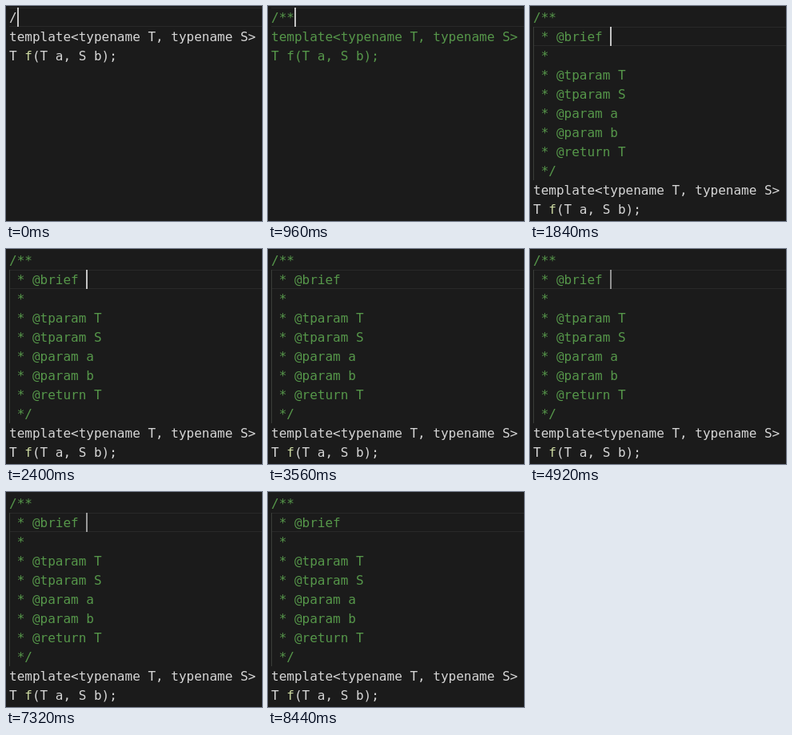
An HTML page with a canvas that plays this animation: 320 px wide and 269 px high, repeating every 8640 ms.

```html
<!DOCTYPE html>
<html lang="en">
<head>
<meta charset="utf-8">
<title>Doc comment typing</title>
<style>
  html, body { margin: 0; width: 100%; height: 100%; overflow: hidden; background: #1b1b1b; }
  canvas { display: block; width: 320px; height: 269px; }
</style>
</head>
<body>
<canvas id="stage"></canvas>
<script>
const W = 320, H = 269, LOOP = 8640;
const LEFT = 4, TOP = 2, LINE = 24, BASE = 18;
const BG = '#1b1b1b', WHITE = '#d6d6d6', GREEN = '#56974a', FUNC = '#cddaa2';
const canvas = document.getElementById('stage');
const ctx = canvas.getContext('2d');
const dpr = window.devicePixelRatio || 1;
canvas.width = W * dpr;
canvas.height = H * dpr;
ctx.scale(dpr, dpr);
ctx.font = '16px "DejaVu Sans Mono", monospace';
const CHAR = ctx.measureText('M').width;

const CODE = ['template<typename T, typename S>', 'T f(T a, S b);'];
const DOC = ['/**', ' * @brief ', ' *', ' * @tparam T', ' * @tparam S',
             ' * @param a', ' * @param b', ' * @return T', ' */'];

// Cursor fades: [start, end, opacity before, opacity after]
const FADES = [
  [3200, 3560, 1, 0], [4640, 5080, 0, 1], [5640, 5960, 1, 0],
  [7080, 7440, 0, 1], [8080, 8440, 1, 0]
];

// Each stage of the edit: start time, comment lines, cursor row and column
const STEPS = [
  { at: 0, doc: ['/'], row: 0, col: 1, code: WHITE },
  { at: 640, doc: ['/*'], row: 0, col: 2, code: GREEN },
  { at: 800, doc: ['/**'], row: 0, col: 3, code: GREEN },
  { at: 1720, doc: ['/**', ''], row: 1, col: 0, code: GREEN },
  { at: 1760, doc: DOC, row: 1, col: 10, code: WHITE }
];

function cursorAlpha(t) {
  let alpha = 1;
  for (const [start, end, from, to] of FADES) {
    if (t < start) break;
    const p = Math.min(1, (t - start) / (end - start));
    alpha = from + (to - from) * p * p * (3 - 2 * p);
  }
  return alpha;
}

function rect(x, y, w, h, color) {
  ctx.fillStyle = color;
  ctx.fillRect(x, y, w, h);
}

function write(text, row, color, col = 0) {
  ctx.fillStyle = color;
  ctx.fillText(text, LEFT + col * CHAR, TOP + row * LINE + BASE);
}

function draw(t) {
  const s = STEPS.filter(step => step.at <= t).pop();
  const rows = s.doc.length;
  const y = TOP + s.row * LINE;

  rect(0, 0, W, H, BG);
  rect(LEFT, y, W - LEFT, 1, '#292929');
  rect(LEFT, y + LINE - 1, W - LEFT, 1, '#292929');
  if (rows > 2) rect(LEFT, TOP + LINE, 1, LINE * (rows - 1), '#3b3d3a');

  s.doc.forEach((line, i) => write(line, i, t < 640 ? WHITE : GREEN));
  write(CODE[0], rows, s.code);
  if (s.code === GREEN) {
    write(CODE[1], rows + 1, GREEN);
  } else {
    write('T', rows + 1, WHITE);
    write('f', rows + 1, FUNC, 2);
    write(CODE[1].slice(3), rows + 1, WHITE, 3);
  }

  ctx.globalAlpha = cursorAlpha(t);
  rect(Math.round(LEFT + s.col * CHAR), y, 2, LINE, '#c4c4c4');
  ctx.globalAlpha = 1;
}

const begin = performance.now();
function tick() {
  draw((performance.now() - begin) % LOOP);
  requestAnimationFrame(tick);
}
tick();
</script>
</body>
</html>
```
